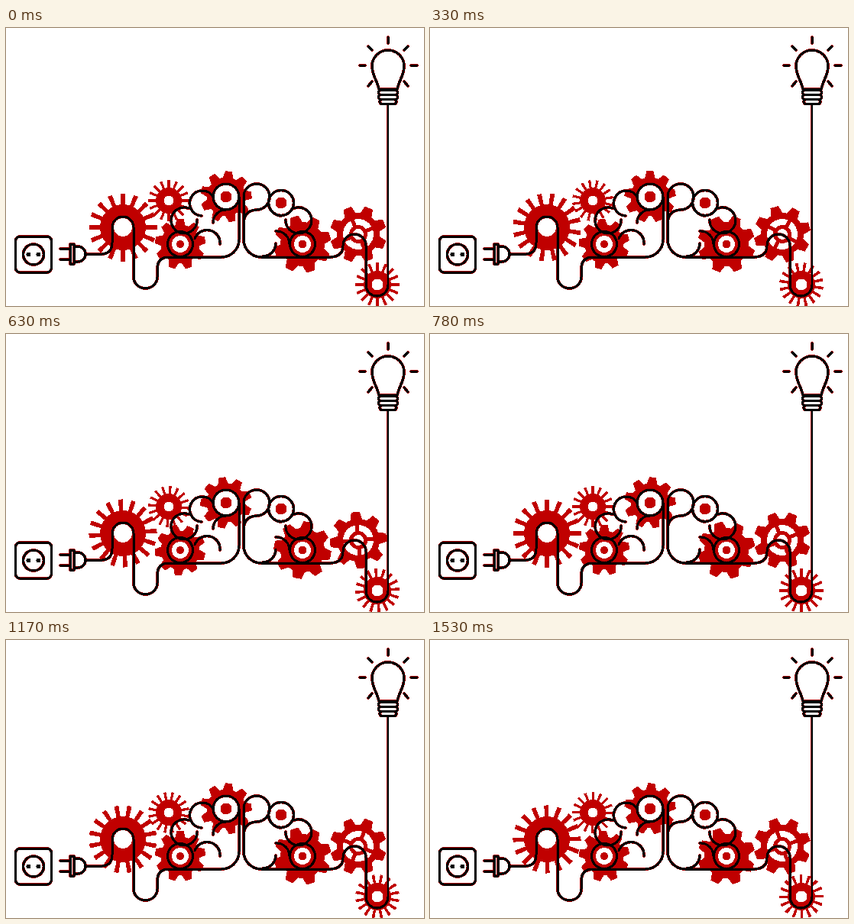
An HTML page for the animation above (1.56 s loop, 547 by 364 pixels).

```html
<!DOCTYPE html>
<html lang="en">
<head>
<meta charset="utf-8">
<title>Gears of thought</title>
<style>
  html, body { margin: 0; width: 100%; height: 100%; overflow: hidden; background: #fff; }
  svg { display: block; width: 547px; height: 364px; shape-rendering: crispEdges; }
  .red { fill: #c00000; }
  .white { fill: #fff; }
  .line { fill: none; stroke-linecap: round; stroke-linejoin: round; }
  .edge { stroke: #a00000; stroke-width: 3.8; }
  .ink { stroke: #000; stroke-width: 3; }
</style>
</head>
<body>
<svg viewBox="0 0 547 364">
  <defs>
    <g id="lines" class="line">
      <!-- socket and plug -->
      <rect x="12.5" y="273" width="47" height="47" rx="6"/>
      <circle cx="36" cy="296.5" r="13.5"/>
      <path d="M71 289H83M71 303H83M84 283H89V309H84ZM90 286H94A10 10 0 0 1 94 306H90"/>
      <!-- cable into the left half -->
      <path d="M105 296H126Q139 295 139 281V261A14 14 0 0 1 167 261V326A15.5 15 0 0 0 198 326V316Q198 300 213 300H282A23 23 0 0 0 305 277V221"/>
      <circle cx="288" cy="221" r="17"/>
      <path d="M288 238A17 17 0 0 0 271 255"/>
      <path d="M271 221A16.5 16.5 0 1 0 256 246"/>
      <path d="M239 236A17 17 0 1 0 250 251"/>
      <circle cx="228" cy="283" r="16.5"/>
      <path d="M247 276A17 17 0 0 1 280 283"/>
      <!-- right half and cable to the bulb -->
      <path d="M311 277V221A17 17 0 1 1 328 238Q311 239 311 256M311 277A23 23 0 0 0 334 300H425Q441 299 441 285A15 15 0 0 1 471 285V336A14.5 15 0 0 0 500 336"/>
      <circle cx="360" cy="229" r="16.5"/>
      <path d="M344 231A17 17 0 0 0 360 246"/>
      <path d="M377 236A17 17 0 1 1 366 251"/>
      <circle cx="388" cy="283" r="16.5"/>
      <path d="M371 283A17 17 0 0 0 353 266M353 282A17 17 0 0 1 336 299"/>
      <!-- bulb -->
      <path d="M488 80C486 69 479 62 479 50A21 21 0 0 1 521 50C521 62 514 69 512 80Z"/>
      <rect x="487.5" y="81.5" width="25" height="6" rx="3"/>
      <rect x="487.5" y="87.5" width="25" height="6" rx="3"/>
      <rect x="489" y="93.5" width="22" height="6" rx="3"/>
      <path d="M500 12V20M474 24L479 29M526 24L521 29M463 49H470M530 49H538M474 76L479 70M526 76L521 70"/>
    </g>
  </defs>

  <g id="gears"></g>

  <!-- hubs -->
  <g class="white">
    <circle cx="153" cy="261" r="12"/>
    <circle cx="213" cy="226" r="6.5"/>
    <circle cx="228" cy="283" r="11"/>
    <circle cx="288" cy="221" r="16"/>
    <circle cx="360" cy="229" r="16"/>
    <circle cx="388" cy="283" r="11"/>
    <circle cx="486" cy="336" r="7.5"/>
  </g>
  <g class="red">
    <circle cx="228" cy="283" r="5"/>
    <circle cx="288" cy="221" r="7.5"/>
    <circle cx="360" cy="229" r="7.5"/>
    <circle cx="388" cy="283" r="5.5"/>
  </g>

  <use href="#lines" class="edge"/>
  <use href="#lines" class="ink"/>
  <path d="M499.5 101V336" stroke="#a00000" stroke-width="3"/>
  <path d="M500 101V336" stroke="#000" stroke-width="2"/>
  <circle cx="29.5" cy="296.5" r="3"/>
  <circle cx="42.5" cy="296.5" r="3"/>
</svg>
<script>
  const LOOP = 1560, STEP = 30;

  // r: outer radius, body: disc radius, base/tip: tooth widths,
  // turn: tooth pitches per loop (negative is anticlockwise)
  const gears = [
    { x: 153, y: 261, r: 44.5, body: 30, teeth: 16, base: 5, tip: 6, phase: 0, turn: 2 },
    { x: 213, y: 226, r: 27, body: 17, teeth: 16, base: 3, tip: 3.4, phase: 0, turn: -2 },
    { x: 228, y: 283, r: 33, body: 25.5, teeth: 9, base: 14, tip: 9, phase: 0, turn: 4 },
    { x: 288, y: 221, r: 33.5, body: 25.5, teeth: 9, base: 14, tip: 9, phase: 6, turn: 4 },
    { x: 388, y: 283, r: 37.5, body: 29, teeth: 8, base: 17, tip: 11, phase: 28, turn: 4 },
    { x: 461, y: 270, r: 37, body: 28, teeth: 8, base: 16, tip: 11, phase: -23, turn: -4, spokes: 4 },
    { x: 486, y: 336, r: 29, body: 18, teeth: 16, base: 3.2, tip: 3.8, phase: 0, turn: 2 }
  ];

  function add(parent, tag, attrs) {
    const el = document.createElementNS("http://www.w3.org/2000/svg", tag);
    for (const key in attrs) el.setAttribute(key, attrs[key]);
    return parent.appendChild(el);
  }

  function build(gear) {
    const { r, body, teeth, base, tip, spokes } = gear;
    const g = add(document.getElementById("gears"), "g", { class: "red" });
    add(g, "circle", { r: body });
    const tooth = `M${-base / 2} ${2 - body}L${-tip / 2} ${-r}H${tip / 2}L${base / 2} ${2 - body}Z`;
    for (let i = 0; i < teeth; i++) {
      add(g, "path", { d: tooth, transform: `rotate(${i * 360 / teeth})` });
    }
    if (spokes) {
      add(g, "circle", { r: 20, class: "white" });
      for (let i = 0; i < spokes; i++) {
        add(g, "rect", { x: -2.5, y: -21, width: 5, height: 14, transform: `rotate(${i * 360 / spokes})` });
      }
      add(g, "circle", { r: 12 });
      add(g, "circle", { r: 7, class: "white" });
    }
    gear.el = g;
  }

  function draw(time) {
    const p = Math.floor((time % LOOP) / STEP) * STEP / LOOP;
    for (const { el, x, y, phase, turn, teeth } of gears) {
      const angle = phase + p * turn * 360 / teeth;
      el.setAttribute("transform", `translate(${x} ${y}) rotate(${angle})`);
    }
  }

  gears.forEach(build);
  const start = performance.now();
  function tick() {
    draw(performance.now() - start);
    requestAnimationFrame(tick);
  }
  tick();
</script>
</body>
</html>
```
